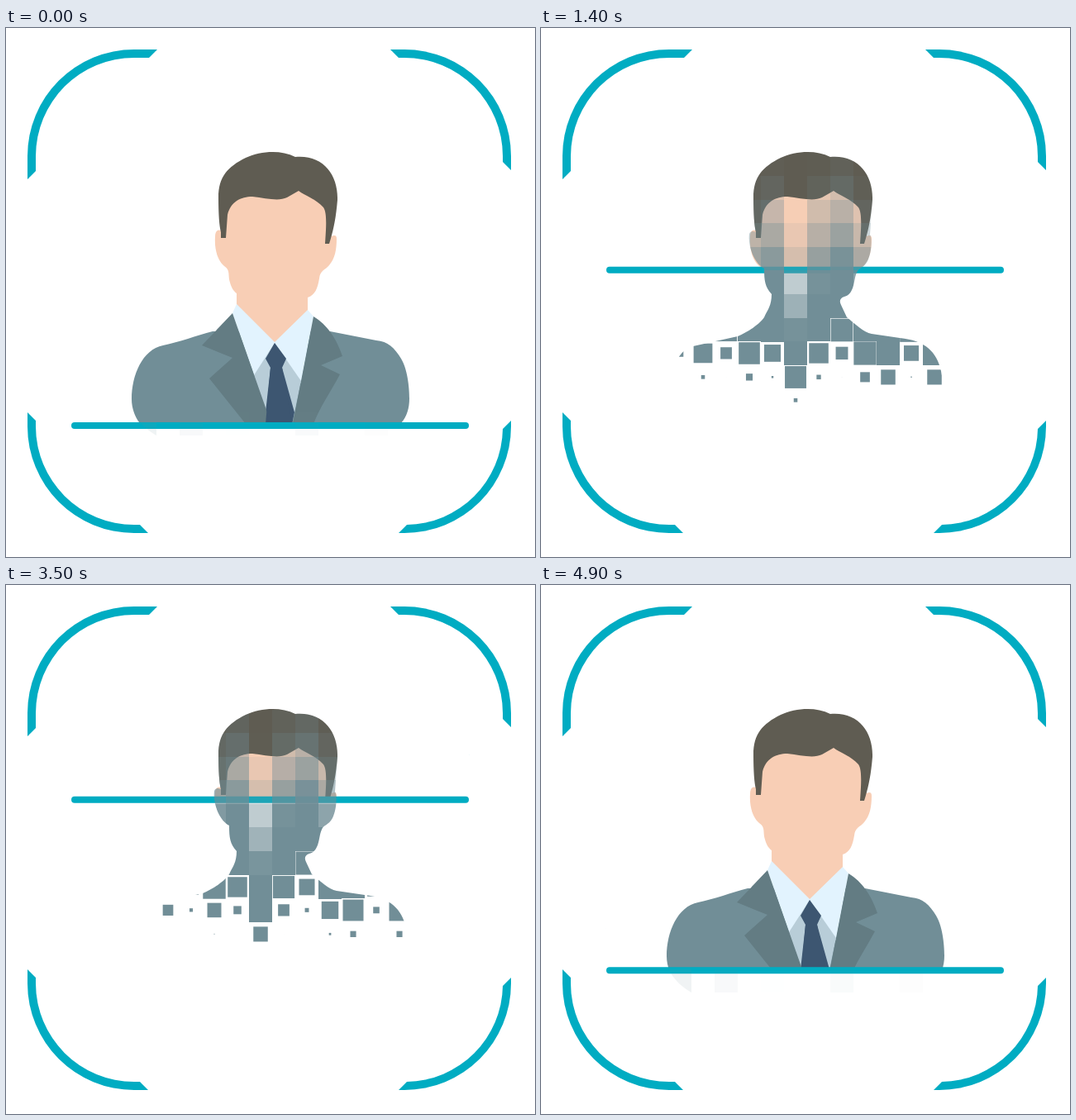
Animation, 640 px wide and 640 px high, one loop 5 s. Source, as an HTML page without scripts:

```html
<!DOCTYPE html>
<html lang="en">
<head>
<meta charset="utf-8">
<title>Face scan</title>
<style>
@property --y { syntax: "<length>"; inherits: true; initial-value: 481px; }
@property --t { syntax: "<number>"; inherits: true; initial-value: 0; }

html, body { margin: 0; width: 100%; height: 100%; overflow: hidden; background: #fff; }

.stage {
  position: relative; width: 640px; height: 640px; overflow: hidden;
  animation: sweep 5s linear infinite, dissolve 5s linear infinite;
}
.stage > * { position: absolute; left: 0; top: 0; width: 640px; height: 640px; }

/* height of the scan line */
@keyframes sweep {
  0% { --y: 481px } 1% { --y: 484px } 10% { --y: 429px } 20% { --y: 364px }
  29% { --y: 284px } 38% { --y: 205.4px } 43% { --y: 172px } 48% { --y: 148.5px }
  51% { --y: 141.8px } 54% { --y: 142.3px } 57% { --y: 150px } 60% { --y: 164px }
  65% { --y: 211px } 70% { --y: 259.6px } 78% { --y: 330px } 88% { --y: 401px }
  98% { --y: 466px } 100% { --y: 481px }
}
/* clock of the cells: forward, then back */
@keyframes dissolve {
  0% { --t: -30 } 20% { --t: 1000 } 51.3% { --t: 2567 } 54% { --t: 2415 }
  70% { --t: 1490 } 78% { --t: 1039 } 98%, 100% { --t: -30 }
}

.man { clip-path: inset(0 0 calc(640px - var(--y)) 0); }

.stage > .line {
  left: 79.2px; top: -4.4px; width: 480.6px; height: 8.8px; border-radius: 4.4px;
  background: #00acc2; transform: translateY(var(--y));
}

.cells {
  box-sizing: border-box; padding: 150.7px 0 0 153.5px;
  clip-path: path("M257 205C257 180 268 168 290 157C308 149 332 147 350 156C384 153 402 178 401 208L398 250C401 254 400 272 395 282C390 291 384 290 382 296C378 303 380 322 367 325C361 327 361 331 363 335L370 350C380 358 390 368 400 370L434 375C465 378 479 392 484 415C489 440 488 468 472 484L462 493H182C160 480 152 465 152 449C154 425 163 389 184 385L238 373C250 368 265 358 270 350C274 341 279 336 279 322C271 313 270 306 270 291C258 285 250 264 252 249C254 245 257 246 260 247C258 240 257 225 257 205Z");
}
.cells div { display: flex; height: 28.55px; }
.cells i {
  --q: calc((var(--t) - var(--row)) / 87 + var(--col));
  flex: none; width: 28.05px; background: #718e97;
  opacity: pow(clamp(0, (var(--q) + 8) / 5.6, 1), 1.5);
  scale: calc(.5 + .5 * cos(clamp(0, var(--q) / 4.1, 1) * 3.1416));
}

/* when each row starts to shrink */
div:nth-child(1) { --row: 2265 }
div:nth-child(2) { --row: 2161 }
div:nth-child(3) { --row: 2074 }
div:nth-child(4) { --row: 1987 }
div:nth-child(5) { --row: 1900 }
div:nth-child(6) { --row: 1813 }
div:nth-child(7) { --row: 1718 }
div:nth-child(8) { --row: 1622 }
div:nth-child(9) { --row: 1500 }
div:nth-child(10) { --row: 1339 }
div:nth-child(11) { --row: 1139 }
div:nth-child(12) { --row: 878 }

/* head start of each column */
i:nth-child(1) { --col: 3.7 }
i:nth-child(2) { --col: 2.3 }
i:nth-child(3) { --col: 3.2 }
i:nth-child(4) { --col: 1.9 }
i:nth-child(5) { --col: 2.6 }
i:nth-child(6) { --col: 0 }
i:nth-child(7) { --col: 2.2 }
i:nth-child(8) { --col: 3.1 }
i:nth-child(9) { --col: 1.55 }
i:nth-child(10) { --col: 1 }
i:nth-child(11) { --col: 2.8 }
i:nth-child(12) { --col: 1 }
</style>
</head>
<body>
<div class="stage">
  <svg viewBox="0 0 640 640" fill="#00acc2">
    <path d="M26 183V155A129 129 0 0 1 155 26H183L173 36H155A119 119 0 0 0 36 155V173Z"/>
    <path d="M465 26H482A129 129 0 0 1 611 155V172L601 162V155A119 119 0 0 0 482 36H475Z"/>
    <path d="M26 465V482A129 129 0 0 0 155 611H172L162 601H155A119 119 0 0 1 36 482V475Z"/>
    <path d="M611 475V482A129 129 0 0 1 482 611H475L485 601A118 118 0 0 0 601 485Z"/>
  </svg>

  <svg class="man" viewBox="0 0 640 640">
    <path fill="#718e97" d="M250 367C230 372 210 380 190 384C165 389 152 420 152 449C152 460 156 470 161 477L182 490H462L478 478C485 470 488 460 488 448C488 440 487 415 478 400C470 387 462 379 448 378L392 367Z"/>
    <path fill="#e2f3fe" d="M279 334L274 345L300 420L357 430L372 349L365 341Z"/>
    <path fill="#b8cdd8" d="M325 381L300 420L318 490H344L357 427Z"/>
    <path fill="#f8ceb5" d="M260 245C255 243 253 247 253 253C252 268 256 281 264 288C272 293 268 299 271 308C273 315 276 319 279 321V334L325 380L365 341V326C374 323 377 315 379 303C380 293 386 293 391 287C398 279 400 268 400 255C400 251 398 250 394 252L388 200L330 180L264 205Z"/>
    <path fill="#3d5671" d="M325 381L339 400L334 411L349 465L344 490H318L314 465L320 411L314 400Z"/>
    <path fill="#637c83" d="M274 345L237 384L274 399L246 424L290 479H320L315 462ZM372 349C384 356 398 370 407 397L381 408L404 419C393 440 380 458 372 479H347Z"/>
    <path fill="#3d5671" d="M320 411L314 479H346L334 411Z"/>
    <path fill="#5f5c52" d="M260 254H266L268 226C272 210 284 204 298 204C315 206 330 210 340 205L354 197C362 203 375 207 384 217C389 224 387 245 386 261H391C396 245 399 232 401 208C402 178 384 153 350 156C332 147 308 149 290 157C268 168 257 180 257 205C257 225 258 240 260 247Z"/>
  </svg>

  <div class="line"></div>

  <div class="cells">
    <div><i></i><i></i><i></i><i></i><i></i><i></i><i></i><i></i><i></i><i></i><i></i><i></i></div>
    <div><i></i><i></i><i></i><i></i><i></i><i></i><i></i><i></i><i></i><i></i><i></i><i></i></div>
    <div><i></i><i></i><i></i><i></i><i></i><i></i><i></i><i></i><i></i><i></i><i></i><i></i></div>
    <div><i></i><i></i><i></i><i></i><i></i><i></i><i></i><i></i><i></i><i></i><i></i><i></i></div>
    <div><i></i><i></i><i></i><i></i><i></i><i></i><i></i><i></i><i></i><i></i><i></i><i></i></div>
    <div><i></i><i></i><i></i><i></i><i></i><i></i><i></i><i></i><i></i><i></i><i></i><i></i></div>
    <div><i></i><i></i><i></i><i></i><i></i><i></i><i></i><i></i><i></i><i></i><i></i><i></i></div>
    <div><i></i><i></i><i></i><i></i><i></i><i></i><i></i><i></i><i></i><i></i><i></i><i></i></div>
    <div><i></i><i></i><i></i><i></i><i></i><i></i><i></i><i></i><i></i><i></i><i></i><i></i></div>
    <div><i></i><i></i><i></i><i></i><i></i><i></i><i></i><i></i><i></i><i></i><i></i><i></i></div>
    <div><i></i><i></i><i></i><i></i><i></i><i></i><i></i><i></i><i></i><i></i><i></i><i></i></div>
    <div><i></i><i></i><i></i><i></i><i></i><i></i><i></i><i></i><i></i><i></i><i></i><i></i></div>
  </div>
</div>
</body>
</html>
```
